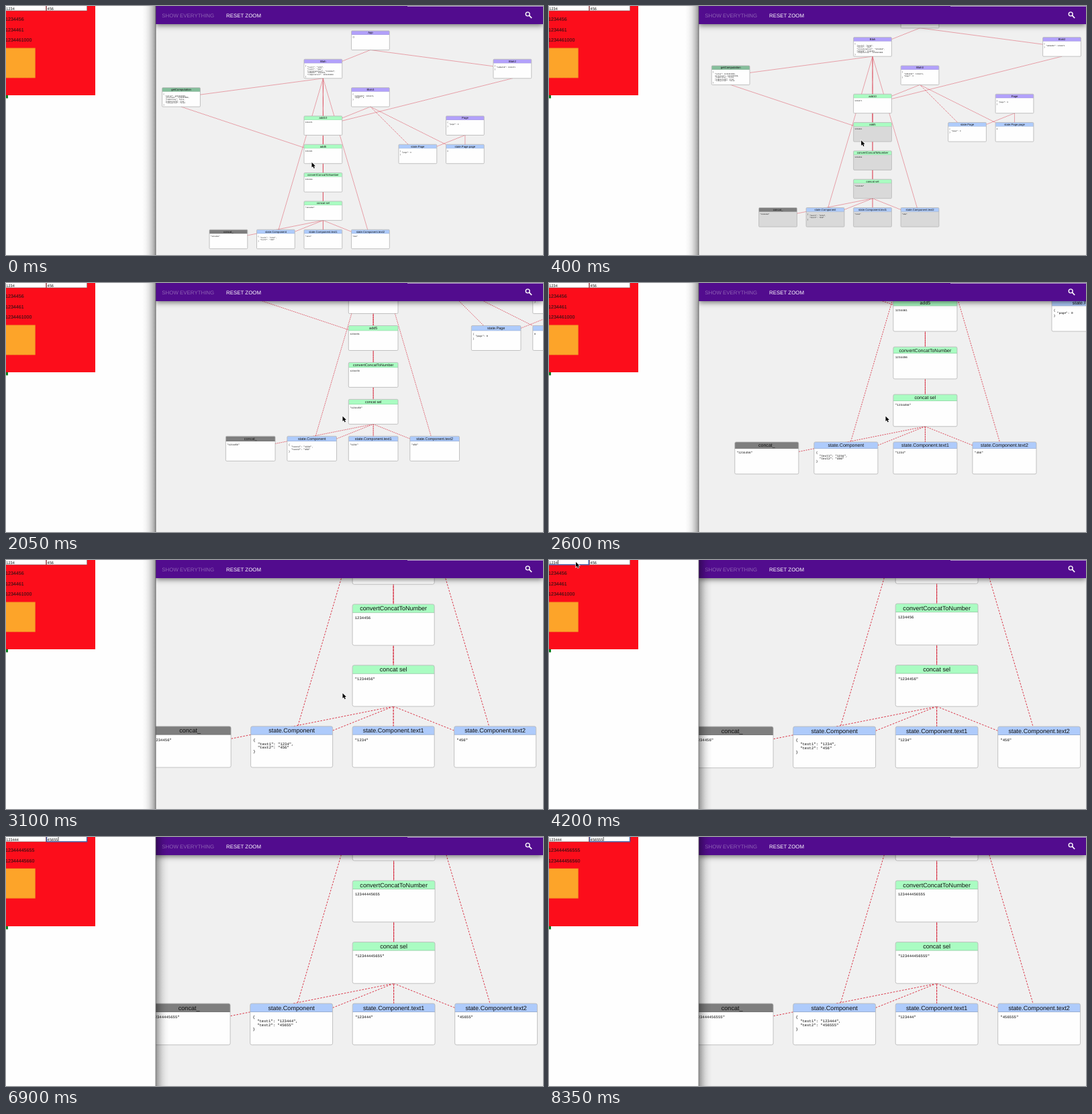
Recreate the animation shown at these times as an HTML page with a canvas. Size 800 px wide and 371 px high, loop 8.4 s.

```html
<!DOCTYPE html>
<html>
<head>
<meta charset="utf-8">
<style>
  html, body { margin: 0; width: 100%; height: 100%; overflow: hidden; background: #fff; }
  canvas { display: block; width: 800px; height: 371px; }
</style>
</head>
<body>
<canvas id="stage"></canvas>
<script>
const LOOP = 8400, W = 800, H = 371, PANE = 223, BAR = 27;
const canvas = document.getElementById('stage');
const ctx = canvas.getContext('2d');
const dpr = window.devicePixelRatio || 1;
canvas.width = W * dpr;
canvas.height = H * dpr;

const SANS = '"Liberation Sans", Arial, sans-serif';
const MONO = '"Liberation Mono", "Courier New", monospace';
const PURPLE = '#b2a1fb', GREEN = '#aafcc2', BLUE = '#aecbfb', TEAL = '#85be9b', GREY = '#7e7e7e';

// Graph nodes: column, row, colour
const BOX = { w: 56.8, h: 28.5, head: 5.9 };
const nodes = {
  'App': [4, 0, PURPLE],
  'Blah': [3, 1, PURPLE],
  'Blah2': [7, 1, PURPLE],
  'getComputation': [0, 2, TEAL],
  'Blah3': [4, 2, PURPLE],
  'add10': [3, 3, GREEN],
  'Page': [6, 3, PURPLE],
  'add5': [3, 4, GREEN],
  'state.Page': [5, 4, BLUE],
  'state.Page.page': [6, 4, BLUE],
  'convertConcatToNumber': [3, 5, GREEN],
  'concat sel': [3, 6, GREEN],
  'concat_': [1, 7, GREY],
  'state.Component': [2, 7, BLUE],
  'state.Component.text1': [3, 7, BLUE],
  'state.Component.text2': [4, 7, BLUE]
};
const deps = {
  'App': ['Blah', 'Blah2'],
  'Blah': ['getComputation', 'add5', 'concat sel', 'state.Component',
    'state.Component.text1', 'state.Component.text2'],
  'Blah2': ['add10'],
  'Blah3': ['add10', 'state.Page', 'state.Page.page'],
  'getComputation': ['add5'],
  'Page': ['state.Page', 'state.Page.page'],
  'add10': ['add5'],
  'add5': ['convertConcatToNumber'],
  'convertConcatToNumber': ['concat sel'],
  'concat sel': ['concat_', 'state.Component', 'state.Component.text1', 'state.Component.text2']
};
const place = ([col, row]) => [(col ? 232.5 : 232.6) + col * 70.5, 37 + row * 42.32];

// Piecewise interpolation over [time, ...values] keys
function track(t, keys, ease = u => u) {
  if (t <= keys[0][0]) return keys[0].slice(1);
  for (let i = 1; i < keys.length; i++) {
    const [a, b] = [keys[i - 1], keys[i]];
    if (t < b[0]) {
      const u = ease((t - a[0]) / (b[0] - a[0]));
      return a.slice(1).map((v, k) => v + (b[k + 1] - v) * u);
    }
  }
  return keys[keys.length - 1].slice(1);
}
const smooth = u => u * u * (3 - 2 * u);

const GRAB = [455.5, 233], DROP = [64.3, -111.8], FOCUS = [501.5, 198.5];
const drag = t => track(t, [[50, 0, 0], [230, 2.5, -12], [400, 9.5, -32.5], [650, 43, -82],
  [780, 60, -106], [850, ...DROP]]);
const zoom = t => track(t, [[1800, 1], [2050, 1.297], [2550, 1.62], [3000, 2.1],
  [3100, 2.149], [3200, 2.163]])[0];
function pointer(t) {
  if (t < 1050) {
    const [dx, dy] = drag(t);
    return [GRAB[0] + dx, GRAB[1] + dy];
  }
  return track(t, [[1050, GRAB[0] + DROP[0], GRAB[1] + DROP[1]], [1650, ...FOCUS],
    [3500, ...FOCUS], [4150, 40, 3]], smooth);
}

const typed = (t, base, char, times) => base + char.repeat(times.filter(x => t >= x).length);
const object = fields => ['{', ...Object.entries(fields).map(([key, value], i, all) =>
  `  "${key}": ${JSON.stringify(value)}${i < all.length - 1 ? ',' : ''}`), '}'];

function appState(t) {
  const text1 = typed(t, '1234', '4', [5050, 5350]);
  const text2 = typed(t, '456', '5', [6400, 6700, 7000]);
  const concatenation = text1 + text2;
  return { text1, text2, concatenation, added5: +concatenation + 5, added10: +concatenation + 15,
    computation: t < 5050 ? 1234461000 : null };
}

function contents(s) {
  const { text1, text2, concatenation, added5, added10, computation } = s;
  const quoted = v => [`"${v}"`];
  return {
    'App': ['{}'],
    'Blah': object({ text1, text2, concatenation, added5, computation }),
    'Blah2': object({ added10 }),
    'Blah3': object({ added10, page: 0 }),
    'getComputation': object({ value: computation, previous: 1234461000,
      isWaiting: false, isResolved: true, isRejected: false }),
    'add10': [added10],
    'Page': object({ page: 0 }),
    'add5': [added5],
    'state.Page': object({ page: 0 }),
    'state.Page.page': ['0'],
    'convertConcatToNumber': [concatenation],
    'concat sel': quoted(concatenation),
    'concat_': quoted(concatenation),
    'state.Component': object({ text1, text2 }),
    'state.Component.text1': quoted(text1),
    'state.Component.text2': quoted(text2)
  };
}

function rect(x, y, w, h, fill) {
  ctx.fillStyle = fill;
  ctx.fillRect(x, y, w, h);
}
function label(text, x, y, size, fill = '#111', font = SANS, align = 'left') {
  ctx.font = `${size}px ${font}`;
  ctx.textAlign = align;
  ctx.fillStyle = fill;
  ctx.fillText(text, x, y);
}
function line(x1, y1, x2, y2) {
  ctx.beginPath();
  ctx.moveTo(x1, y1);
  ctx.lineTo(x2, y2);
  ctx.stroke();
}

function hoveredSet(px, py) {
  const set = new Set();
  const visit = name => {
    set.add(name);
    (deps[name] || []).forEach(visit);
  };
  for (const name in nodes) {
    const [x, y] = place(nodes[name]);
    if (px > x && px < x + BOX.w && py > y && py < y + BOX.h) visit(name);
  }
  return set;
}

function drawNode(name, lines, shaded, scale) {
  const [x, y] = place(nodes[name]), { w, h, head } = BOX;
  ctx.save();
  ctx.beginPath();
  ctx.roundRect(x, y, w, h, 1.2);
  ctx.save();
  ctx.clip();
  rect(x, y, w, h, shaded ? '#d9d9d9' : '#fefefe');
  rect(x, y, w, head, nodes[name][2]);
  rect(x, y + head - .3, w, .3, 'rgba(0,0,0,.25)');
  ctx.restore();
  ctx.strokeStyle = '#b4b4b4';
  ctx.lineWidth = .8 / scale;
  ctx.stroke();
  label(name, x + w / 2, y + 4.4, 4.22, '#111', SANS, 'center');
  lines.forEach((text, i) => label(text, x + 1.7, y + 10.3 + i * 2.65, 2.6, '#000', MONO));
  ctx.restore();
}

function drawGraph(t, state) {
  const scale = zoom(t);
  const [dx, dy] = drag(t);
  const ox = dx + (FOCUS[0] - DROP[0]) * (1 - scale) + DROP[0] * (1 - scale);
  const oy = dy + (FOCUS[1] - DROP[1]) * (1 - scale) + DROP[1] * (1 - scale);
  // Zooming keeps the point under the pointer fixed
  const tx = scale === 1 ? dx : ox - DROP[0] * (1 - scale);
  const ty = scale === 1 ? dy : oy - DROP[1] * (1 - scale);
  ctx.save();
  ctx.translate(tx, ty);
  ctx.scale(scale, scale);

  ctx.strokeStyle = '#d8283c';
  ctx.lineWidth = (.5 + .2 * scale) / scale;
  ctx.setLineDash([1.2, .9]);
  for (const from in deps) {
    const [x, y] = place(nodes[from]);
    for (const to of deps[from]) {
      const [x2, y2] = place(nodes[to]);
      line(x + BOX.w / 2, y + BOX.h, x2 + BOX.w / 2, y2 + BOX.h / 2);
    }
  }
  ctx.setLineDash([]);

  const [px, py] = pointer(t);
  const hovered = t > 100 && px > PANE ? hoveredSet((px - tx) / scale, (py - ty) / scale) : new Set();
  const text = contents(state);
  for (const name in nodes) drawNode(name, text[name], hovered.has(name), scale);
  ctx.restore();
}

function drawBar() {
  ctx.save();
  ctx.shadowColor = 'rgba(0,0,0,.55)';
  ctx.shadowBlur = 8 * dpr;
  ctx.shadowOffsetY = 2 * dpr;
  rect(PANE, 0, W - PANE, BAR, '#520c8e');
  ctx.restore();
  rect(598, 0, 202, .8, '#c9bdd6');
  label('SHOW EVERYTHING', 232.3, 16.9, 7.9, '#8d62b3');
  label('RESET ZOOM', 328, 16.9, 7.9, '#fff');
  ctx.strokeStyle = '#fff';
  ctx.lineWidth = 1.4;
  ctx.beginPath();
  ctx.arc(777.2, 12, 2.9, 0, 7);
  ctx.stroke();
  ctx.lineWidth = 1.7;
  line(779.4, 14.2, 783.2, 18);
}

function drawPane(t, state) {
  ctx.save();
  ctx.beginPath();
  ctx.rect(PANE, 0, W - PANE, H);
  ctx.clip();
  rect(PANE, 0, W - PANE, H, '#f0f0f0');
  drawGraph(t, state);
  drawBar();
  ctx.restore();
}

function drawInput(x, text, focused, t) {
  rect(x, -6, 60, 13, '#fff');
  ctx.strokeStyle = focused ? '#3d5fa8' : '#777';
  ctx.lineWidth = focused ? 1.4 : .6;
  ctx.strokeRect(x, -6, 60, 13);
  label(text, x + 1, 5.6, 5.6);
  if (focused) rect(x + 1.5 + ctx.measureText(text).width, 0, .7, 6.2, '#111');
}

function drawApp(t, state) {
  rect(0, 0, PANE, H, '#fefefe');
  rect(0, 133, 3, 4.5, '#0b7f1c');
  rect(0, 0, 133, 133, '#fc0d1b');
  drawInput(-.7, state.text1, t >= 4200 && t < 6000, t);
  drawInput(60.6, state.text2, t >= 6000, t);
  const rows = [state.concatenation, state.added5];
  if (state.computation) rows.push(state.computation);
  rows.forEach((value, i) => label(value, -1, 22.1 + i * 15.6, 7.1));
  const top = 15.5 + rows.length * 15.7;
  rect(0, top, 43.7, 44.6, '#fda429');
  ctx.strokeStyle = '#d9731f';
  ctx.lineWidth = .6;
  ctx.setLineDash([1, 1]);
  ctx.strokeRect(-2, top + .3, 45.4, 44);
  ctx.setLineDash([]);
}

// Soft shadow cast by whichever window is in front
function drawShadow(appInFront) {
  const end = PANE + (appInFront ? 20 : -20);
  const fade = ctx.createLinearGradient(PANE, 0, end, 0);
  [.4, .23, .1, .03, 0].forEach((a, i) => fade.addColorStop(i / 4, `rgba(0,0,0,${a})`));
  rect(Math.min(PANE, end), 0, 20, H, fade);
  rect(PANE - .4, 0, .8, H, appInFront ? '#777' : '#555');
}

function drawPointer(x, y) {
  ctx.save();
  ctx.translate(x, y);
  ctx.beginPath();
  [[0, 0], [0, 7.6], [1.8, 6], [3.1, 8.9], [4.4, 8.3], [3.2, 5.5], [5.5, 5.4]]
    .forEach(p => ctx.lineTo(...p));
  ctx.closePath();
  ctx.strokeStyle = '#fff';
  ctx.lineWidth = 1.2;
  ctx.stroke();
  ctx.fillStyle = '#000';
  ctx.fill();
  ctx.restore();
}

function draw(t) {
  ctx.setTransform(dpr, 0, 0, dpr, 0, 0);
  ctx.textRendering = 'geometricPrecision';
  const state = appState(t);
  drawApp(t, state);
  drawPane(t, state);
  drawShadow(t >= 4200);
  if (t < 5050) drawPointer(...pointer(t));
}

const start = performance.now();
function frame() {
  draw((performance.now() - start) % LOOP);
  requestAnimationFrame(frame);
}
frame();
</script>
</body>
</html>
```
